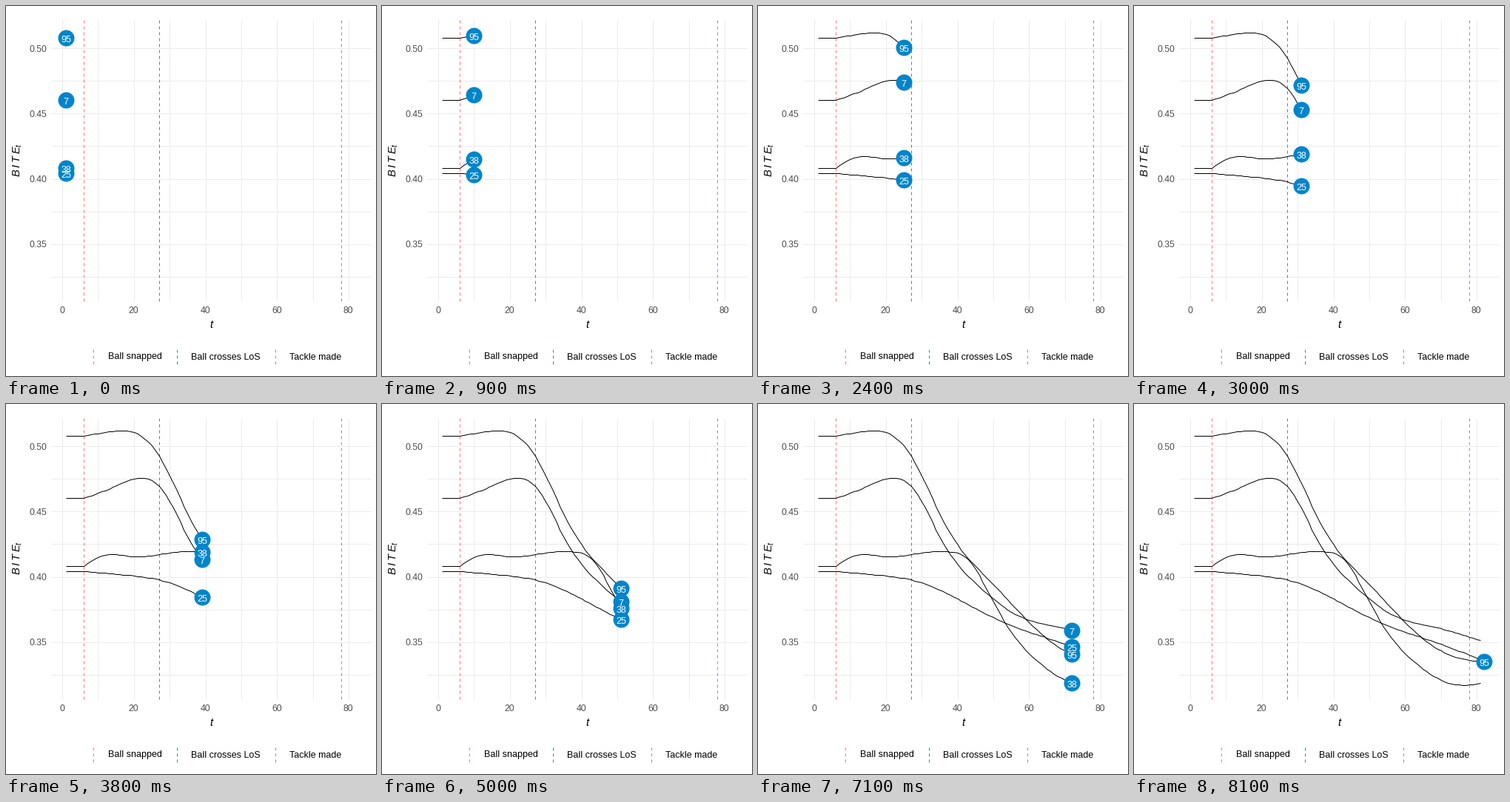
A matplotlib script for the animation above (8200 ms loop, 500 px wide and 500 px high).

```python
import numpy as np
import matplotlib.pyplot as plt
from matplotlib.animation import FuncAnimation

SIZE, DPI = 500, 100
PT = 72 / DPI  # points per pixel
LEFT, RIGHT, TOP, BOTTOM = 61, 493, 19, 399
BLUE = "#0085CA"
STEPS = 82
SNAP_STEP = 6  # curves stay level until the ball is snapped

plt.rcParams.update({
    "font.family": "Liberation Sans",
    "mathtext.fontset": "custom",
    "mathtext.it": "Liberation Sans:italic",
    "toolbar": "None",
})

# Key points (step, height in pixels) that each curve passes through
PLAYERS = {
    "95": [(6, 43), (15, 36.5), (22, 43), (28, 78), (36, 158),
           (50, 244), (64, 313), (73, 340), (82, 348)],
    "7": [(6, 127), (14, 112.5), (23, 100), (28, 116.5), (36, 188),
          (45, 242), (57, 286), (68, 301), (82, 321)],
    "38": [(6, 219), (9, 209), (13, 203), (20, 206), (30, 201), (38, 199.5),
           (43, 210), (48, 249), (55, 308), (64, 354), (73, 378), (82, 376.5)],
    "25": [(6, 226), (18, 231), (31, 243), (43, 271),
           (55, 299), (68, 321), (82, 347)],
}


def last_step(name):
    return STEPS if name == "95" else STEPS - 1


def x_at(t):
    return np.round(76 + 4.838 * np.asarray(t))


def spline(points, t):
    """Natural cubic spline through the points."""
    x, y = np.array(points, float).T
    h = np.diff(x)
    slopes = np.diff(y) / h
    matrix = np.eye(len(x))
    rhs = np.zeros(len(x))
    for k in range(1, len(x) - 1):
        matrix[k, k - 1:k + 2] = h[k - 1], 2 * (h[k - 1] + h[k]), h[k]
        rhs[k] = 6 * (slopes[k] - slopes[k - 1])
    bend = np.linalg.solve(matrix, rhs)
    i = np.clip(np.searchsorted(x, t, side="right") - 1, 0, len(h) - 1)
    b = (t - x[i]) / h[i]
    a = 1 - b
    curve = (a ** 3 - a) * bend[i] + (b ** 3 - b) * bend[i + 1]
    return a * y[i] + b * y[i + 1] + curve * h[i] ** 2 / 6


fig = plt.figure(figsize=(SIZE / DPI, SIZE / DPI), dpi=DPI, facecolor="white")
ax = fig.add_axes([0, 0, 1, 1])
ax.set_xlim(0, SIZE)
ax.set_ylim(SIZE, 0)
ax.axis("off")


def stroke(xs, ys, color, z=1, **kw):
    return ax.plot(xs, ys, color=color, lw=PT, zorder=z,
                   solid_capstyle="butt", dash_capstyle="butt", **kw)[0]


def label(x, y, text, px, color="black", ha="center", va="baseline", **kw):
    return ax.text(x, y, text, fontsize=px * PT, color=color, ha=ha, va=va, **kw)


def dashed(x, bottom, top, color):
    stroke([x, x], [bottom, top], color, 2, ls=(0, (4, 4)))


# Grid and axis labels
for k in range(9):
    x = x_at(10 * k)
    stroke([x, x], [TOP, BOTTOM], "#EBEBEB")
    if k % 2 == 0:
        label(x - 0.3, 415, str(10 * k), 12.2, "#4D4D4D")
for k in range(8):
    y = int(57 + 44.25 * k)
    stroke([LEFT, RIGHT], [y, y], "#EBEBEB")
    if k % 2 == 0:
        label(55.5, y + 4.5, f"{0.5 - 0.025 * k:.2f}", 12.2, "#4D4D4D", "right")
label(277, 435, "t", 15, style="italic")
label(16, 208, r"$B\hspace{0.22}I\hspace{0.22}T\hspace{0.22}E_t$", 14.7,
      rotation=90, va="center")

# Event markers and their legend
EVENTS = [
    (SNAP_STEP, "#F8766D", "Ball snapped", 118, 138),
    (27, "#00BA38", "Ball crosses LoS", 231, 250),
    (78, "#619CFF", "Tackle made", 364, 383),
]
for t, color, name, key_x, name_x in EVENTS:
    dashed(x_at(t), BOTTOM, TOP, color)
    dashed(key_x, 484, 464, color)
    label(name_x, 477.5, name, 12.5, ha="left")

# Moving parts
steps = np.arange(1, STEPS + 1)
xs = x_at(steps)
curves = {n: np.round(spline(p, np.maximum(steps, SNAP_STEP)))
          for n, p in PLAYERS.items()}
lines = {n: stroke([], [], "black", 3, snap=False) for n in PLAYERS}
dots, = ax.plot([], [], "o", ms=22 * PT, mew=0, color=BLUE, zorder=4)
numbers = {n: label(0, 0, n, 12.5, "white", zorder=5) for n in PLAYERS}


def draw(frame):
    step = frame + 1
    active = [n for n in PLAYERS if step <= last_step(n)]
    for name, line in lines.items():
        count = min(step, last_step(name))
        line.set_data(xs[:count] + 0.5, curves[name][:count] + 0.5)
        numbers[name].set_visible(name in active)
        numbers[name].set_position((xs[frame], curves[name][frame] + 6))
    dots.set_data([xs[frame]] * len(active), [curves[n][frame] for n in active])
    return [*lines.values(), dots, *numbers.values()]


anim = FuncAnimation(fig, draw, frames=STEPS, interval=100, repeat=True,
                     repeat_delay=0, blit=False)
plt.show()
```
